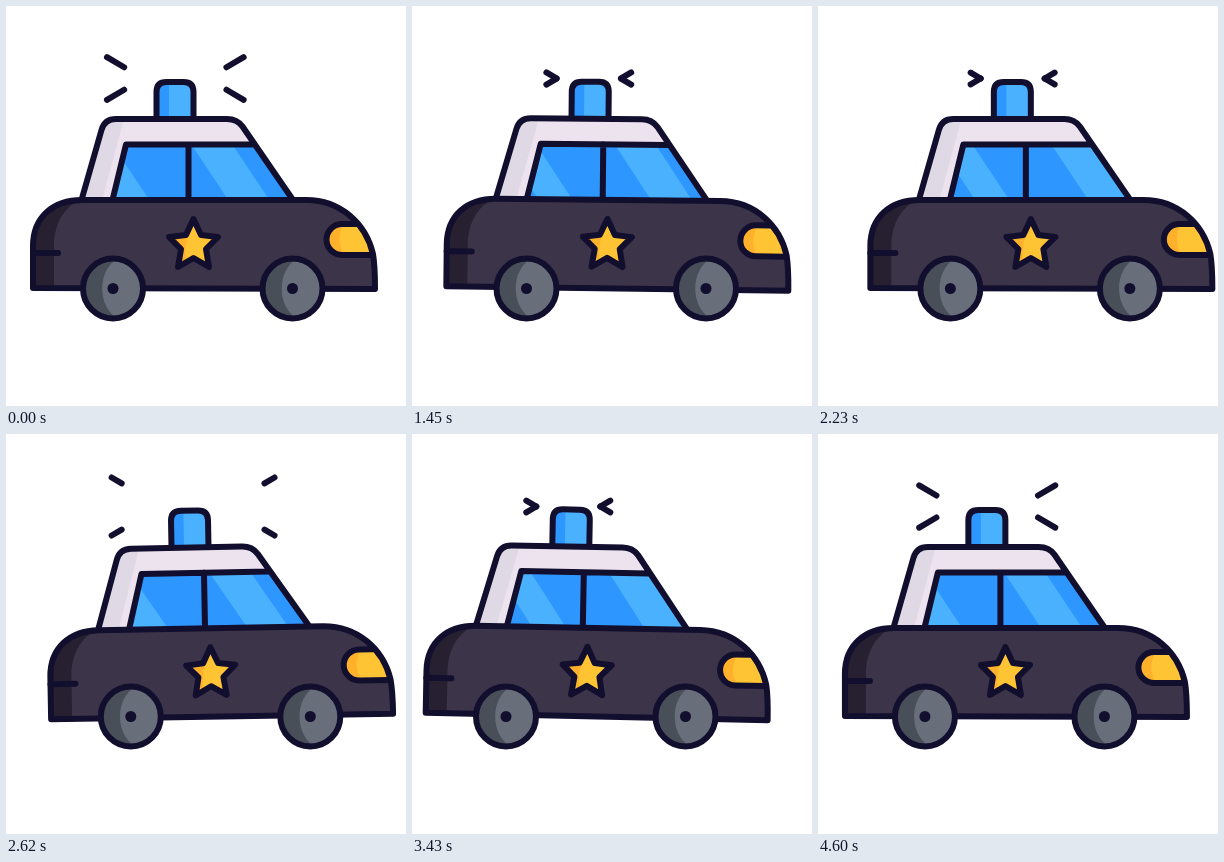
Write an HTML page that moves like this. It is 400x400 px and loops after 4630 ms.

```html
<!DOCTYPE html>
<html lang="en">
<head>
<meta charset="utf-8">
<title>Patrol car</title>
<style>
  html, body { margin: 0; width: 100%; height: 100%; overflow: hidden; background: #fff; }
  svg { display: block; width: 100vw; height: 100vh; }
  .ink { stroke: #120e2e; stroke-width: 6; stroke-linecap: round; stroke-linejoin: round; }
</style>
</head>
<body>
<svg viewBox="0 0 400 400">
  <defs>
    <clipPath id="glass"><path d="M106.500 194L120 138.500H247L286.500 194Z"/></clipPath>
    <g id="wheel">
      <circle r="30" fill="#686f7b"/>
      <path d="M5 -29.500A30 30 0 1 0 5 29.500C-16 20 -16 -20 5 -29.500Z" fill="#484f59"/>
      <circle class="ink" r="30" fill="none"/>
      <circle r="5.500" fill="#120e2e"/>
    </g>
  </defs>
  <g id="rays" class="ink"></g>
  <g id="car">
    <g id="body">
      <path d="M150.500 113V86Q150.500 76 160.500 76H177.500Q187.500 76 187.500 86V113Z" fill="#4ab1ff"/>
      <path d="M150.500 113V86Q150.500 76 160.500 76H163V113Z" fill="#2e97ff"/>
      <path class="ink" d="M150.500 113V86Q150.500 76 160.500 76H177.500Q187.500 76 187.500 86V113" fill="none"/>

      <path d="M75.500 194L95.500 124Q98.500 113 110 113H221Q231 113 236.500 120.500L287 194Z" fill="#ece3ee"/>
      <path d="M75.500 194L95.500 124Q98.500 113 110 113H118L96 194Z" fill="#dfd9e5"/>
      <g clip-path="url(#glass)">
        <path d="M100 130H300V200H100Z" fill="#2e97ff"/>
        <path id="glint" d="M72 138H106L144 195H110ZM185 138H226L264 195H223Z" fill="#4ab1ff"/>
      </g>
      <path class="ink" d="M75.500 194L95.500 124Q98.500 113 110 113H221Q231 113 236.500 120.500L287 194M106.500 194L120 138.500H247M182.500 138.500V194" fill="none"/>

      <path d="M27 282V240C27 211 47 194 76 194H300C335 194 360 218 367 248Q369 260 369 283Z" fill="#3c3448"/>
      <path d="M27 282V240C27 211 47 194 76 194C58 199 48 219 48 240V282Z" fill="#262031"/>
      <path d="M351 218H336A15.500 15.500 0 0 0 336 249H366Q362 231 351 218Z" fill="#ffc433"/>
      <path d="M338 218H336A15.500 15.500 0 0 0 336 249H338Q329 233 338 218Z" fill="#ffb12c"/>
      <path class="ink" d="M350 218H336A15.500 15.500 0 0 0 336 249H366M27 247H52" fill="none"/>
      <path class="ink" d="M27 282V240C27 211 47 194 76 194H300C335 194 360 218 367 248Q369 260 369 283Z" fill="none"/>
      <path d="M187.500 213L180 229L163 231L175 243L172 261L187.500 252L203 261L200 243L212 231L195 229Z" fill="#ffc433"/>
      <path d="M187.500 213L180 229L163 231L175 243L172 261L180 256Q177 238 187.500 213Z" fill="#ffb12c"/>
      <path class="ink" d="M187.500 213L180 229L163 231L175 243L172 261L187.500 252L203 261L200 243L212 231L195 229Z" fill="none"/>
    </g>
    <use href="#wheel" x="107" y="282.500"/>
    <use href="#wheel" x="286.500" y="282.500"/>
  </g>
</svg>
<script>
const REST = 1030, DRIVE = 3600, BEAT = 400, MID_FLIGHT = 0.576;
const $ = id => document.getElementById(id);
const lerp = (a, b, p) => a + (b - a) * p;
const smooth = p => p * p * (3 - 2 * p);

// Eased value through [time, value] keys
function track(keys, t) {
  const i = Math.max(1, keys.findIndex(k => k[0] >= t));
  const [t0, a] = keys[i - 1], [t1, b] = keys[i];
  return lerp(a, b, smooth((t - t0) / (t1 - t0)));
}

const shift = [[0, 0], [1170, 25.4], [2770, -19], [DRIVE, 0]];
const tilt = [[0, 0], [800, 1.05], [1600, -1.05], [2400, 1.05], [3200, -1.05], [DRIVE, 0]];

const rays = [[-1, -1], [1, -1], [-1, 1], [1, 1]].map(([sx, sy]) => {
  const line = document.createElementNS('http://www.w3.org/2000/svg', 'line');
  line.setAttribute('transform', `scale(${sx} ${sy})`);
  $('rays').append(line);
  return line;
});

// Each beat the rays fly outwards; the loop starts and ends mid-flight
function flight(t) {
  const beat = Math.floor(t / BEAT);
  const from = beat === 0 ? MID_FLIGHT : 0;
  const to = beat === DRIVE / BEAT - 1 ? MID_FLIGHT : 1;
  return lerp(from, to, smooth(t / BEAT - beat));
}

function draw(t) {
  const x = track(shift, t);
  $('car').setAttribute('transform', `translate(${x} 0)`);
  $('body').setAttribute('transform', `rotate(${track(tilt, t)} 198 265)`);
  const slide = 15 * (1 - Math.cos(t / DRIVE * 14 * Math.PI));
  $('glint').setAttribute('transform', `translate(${slide} 0)`);

  const p = flight(t);
  const centre = 5 + 39.5 * p, half = 5 + 3.7 * Math.sin(Math.PI * p);
  $('rays').setAttribute('transform', `translate(${169.3 + x} 72.5)`);
  for (const ray of rays) {
    [centre - half, centre + half].forEach((d, i) => {
      ray.setAttribute('x' + (i + 1), 32 + d);
      ray.setAttribute('y' + (i + 1), 0.586 * d);
    });
  }
}

const start = performance.now();
function tick() {
  const t = (performance.now() - start) % (REST + DRIVE);
  draw(Math.max(0, t - REST));
  requestAnimationFrame(tick);
}
tick();
</script>
</body>
</html>
```
